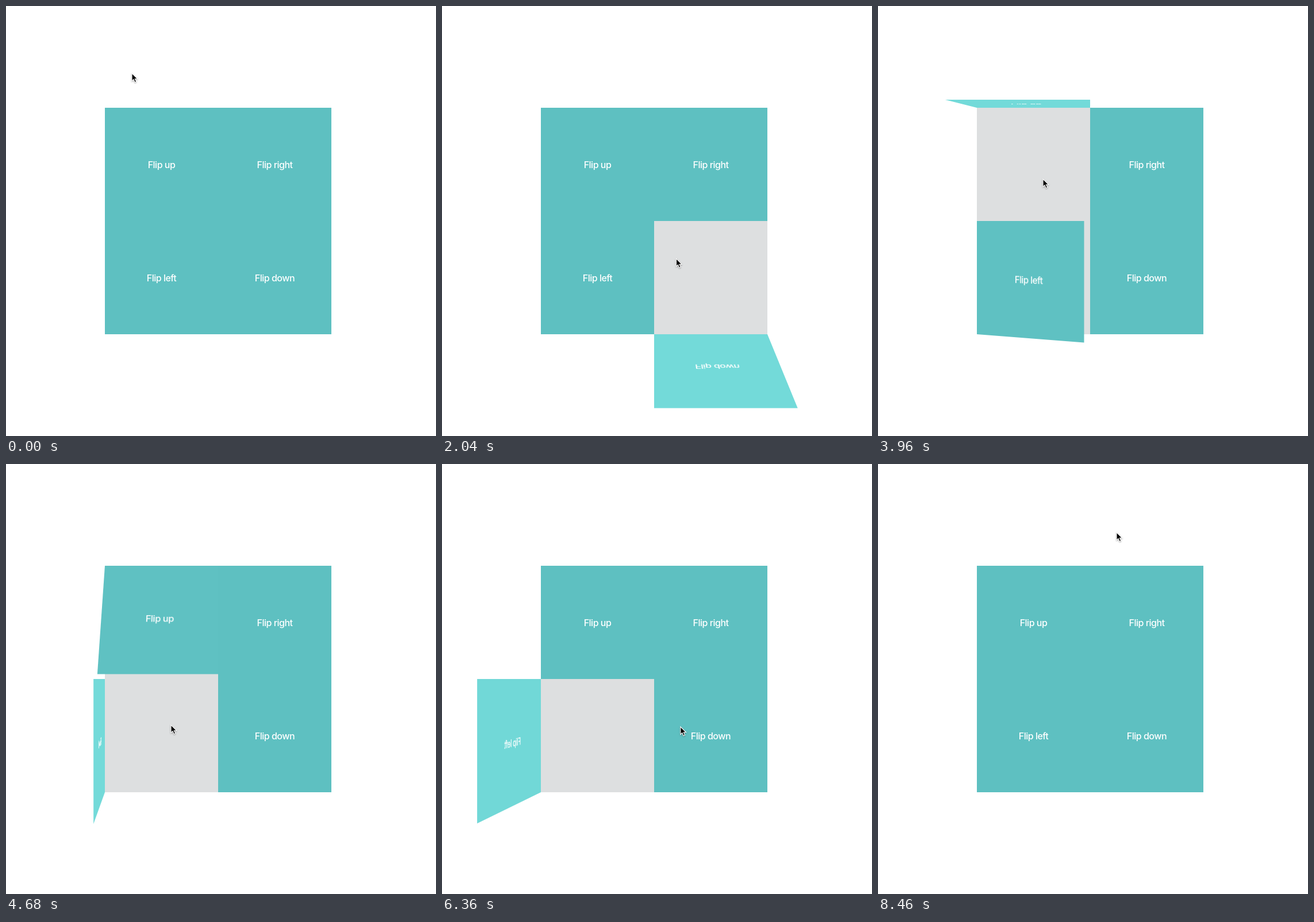
Recreate the animation shown at these times as an HTML page. Size 748 by 748 pixels, loop 8.52 s.

```html
<!DOCTYPE html>
<html lang="en">
<head>
<meta charset="utf-8">
<title>Flip tiles</title>
<style>
  html, body { margin: 0; width: 100%; height: 100%; overflow: hidden; background: #fff; }
  #grid {
    position: absolute; left: 172px; top: 177px; width: 394px; height: 394px;
    background: #dddfe0; perspective: 889px; perspective-origin: 50% 50%;
  }
  .tile {
    position: absolute; width: 197px; height: 197px;
    display: flex; align-items: center; justify-content: center;
    color: #fff; font: 450 16px Inter, Roboto, sans-serif; letter-spacing: -.5px;
    white-space: nowrap;
  }
  #cursor {
    position: absolute; left: -2px; top: -3px; overflow: visible;
    filter: drop-shadow(0 1px 1px rgba(0, 0, 0, .35));
  }
</style>
</head>
<body>
<div id="grid"></div>
<svg id="cursor" width="16" height="22" viewBox="-2 -2 16 22">
  <path d="M0 0V13.4L3 10.7L5.2 15.8L7.7 14.7L5.5 9.8H9.8Z" fill="#000" stroke="#fff" stroke-width="1.1"/>
</svg>
<script>
const LOOP = 8520, STEP = 60, MAX_ANGLE = 120;
const TURN_MS = 400, TINT_MS = 300, MOVE_MS = 240;
const CENTER = [369, 374], SIZE = 197, DEAD_ZONE = 48;
const REST = [94, 192, 193], LIT = [119, 223, 222];

// side: which quarter of the grid; the tile turns on its outer edge
const tiles = [
  { name: 'up', side: [-1, -1], origin: 'top', axis: 'X', sign: 1 },
  { name: 'right', side: [1, -1], origin: 'right', axis: 'Y', sign: 1 },
  { name: 'left', side: [-1, 1], origin: 'left', axis: 'Y', sign: -1 },
  { name: 'down', side: [1, 1], origin: 'bottom', axis: 'X', sign: -1 }
];

// pointer moves: middle of the move, then where it ends
const START = [219, 118];
const moves = [
  [300, 262, 285], [853, 465, 285], [1426, 465, 463], [1964, 406, 440],
  [2190, 285, 455], [2700, 285, 297], [3370, 285, 470], [3762, 287, 302],
  [4490, 287, 455], [4936, 292, 295], [5137, 296, 458], [5315, 298, 287],
  [5476, 278, 461], [6335, 460, 457], [6735, 460, 300], [7320, 445, 463],
  [7708, 445, 300], [8073, 415, 120]
];

const mix = (a, b, k) => a + (b - a) * k;
const clamp = x => Math.min(1, Math.max(0, x));
const swing = u => u < .5 ? 4 * u ** 3 : 1 - 4 * (1 - u) ** 3;
const bezier = (u, a, b) => 3 * u * (1 - u) ** 2 * a + 3 * u * u * (1 - u) * b + u ** 3;

// the CSS "ease" curve
function ease(x) {
  if (x <= 0) return 0;
  if (x >= 1) return 1;
  let lo = 0, hi = 1;
  for (let i = 0; i < 24; i++) {
    const mid = (lo + hi) / 2;
    if (bezier(mid, .25, .25) < x) lo = mid; else hi = mid;
  }
  return bezier(lo, .1, 1);
}

// each move adds its share, so close moves blend
function pointer(t) {
  let [x, y] = START, last = START;
  for (const [middle, ...end] of moves) {
    const k = swing(clamp((t - middle) / MOVE_MS + .5));
    x += (end[0] - last[0]) * k;
    y += (end[1] - last[1]) * k;
    last = end;
  }
  return [x, y];
}

const isOver = (side, point) => side.every((s, i) => {
  const d = (point[i] - CENTER[i]) * s;
  return d > DEAD_ZONE && d < SIZE;
});

// openness from 0 to 1; a reversed turn takes proportionally less time
function openness(toggles, t, ms) {
  let from = 0, to = 0, start = 0;
  const at = time => {
    const span = ms * Math.abs(to - from);
    return span ? mix(from, to, ease((time - start) / span)) : to;
  };
  for (const time of toggles) {
    if (time > t) break;
    from = at(time);
    to = to ? 0 : 1;
    start = time;
  }
  return at(t);
}

const grid = document.getElementById('grid');
const cursor = document.getElementById('cursor');

for (const tile of tiles) {
  const el = tile.el = document.createElement('div');
  el.className = 'tile';
  el.textContent = 'Flip ' + tile.name;
  el.style.left = (tile.side[0] < 0 ? 0 : SIZE) + 'px';
  el.style.top = (tile.side[1] < 0 ? 0 : SIZE) + 'px';
  el.style.transformOrigin = tile.origin;
  grid.append(el);
  tile.toggles = [];
}

// find when the pointer enters and leaves each tile
for (let t = 0; t < LOOP; t++) {
  const point = pointer(t);
  for (const { side, toggles } of tiles) {
    const wasOver = toggles.length % 2 === 1;
    if (isOver(side, point) !== wasOver) toggles.push(t);
  }
}

function draw(t) {
  for (const { el, axis, sign, toggles } of tiles) {
    const angle = MAX_ANGLE * openness(toggles, t, TURN_MS);
    const tint = openness(toggles, t, TINT_MS);
    el.style.transform = angle < .3 ? 'none' : `rotate${axis}(${sign * angle}deg)`;
    el.style.background = `rgb(${REST.map((c, i) => Math.round(mix(c, LIT[i], tint)))})`;
  }
  const [x, y] = pointer(t);
  cursor.style.transform = `translate(${x}px, ${y}px)`;
}

const begin = performance.now();
function tick() {
  const t = (performance.now() - begin) % LOOP;
  draw(Math.floor(t / STEP) * STEP);
  requestAnimationFrame(tick);
}
draw(0);
requestAnimationFrame(tick);
</script>
</body>
</html>
```
